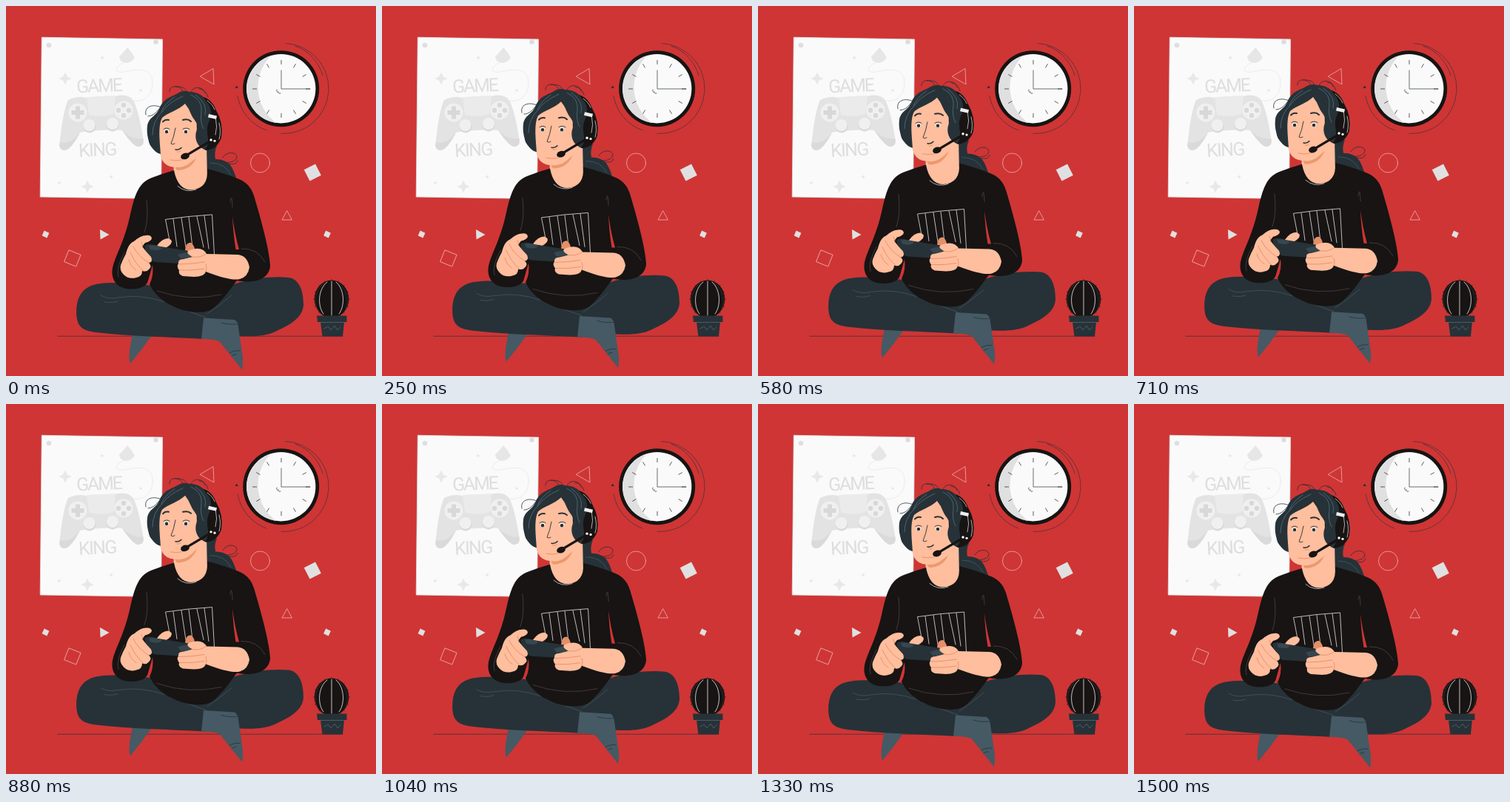
Recreate the animation shown at these times as an HTML page. Size 500 by 500 pixels, loop 1540 ms.

```html
<!DOCTYPE html>
<html lang="en">
<head>
<meta charset="utf-8">
<title>Game king</title>
<style>
  html, body { margin: 0; width: 100%; height: 100%; overflow: hidden; background: #cf3535; }
  svg { display: block; width: 100vw; height: 100vh; }
  .line { fill: none; stroke-linecap: round; stroke-linejoin: round; }
  .thin { stroke-width: .8; }
  .skin { fill: #ffbe9d; }
  .crease { stroke: #e58f68; stroke-width: .9; }
  .slate { fill: #263238; }
  .black { fill: #171413; }
  .pale { fill: #e0e0e0; }
  .word { font: 400 25px Roboto, sans-serif; fill: #dedede; }
</style>
</head>
<body>
<svg viewBox="0 0 500 500">
  <rect width="500" height="500" fill="#cf3535"/>

  <!-- poster -->
  <path d="M48.300 42.300L211.500 45L209.500 260.500L46.200 258Z" fill="#fafafa" stroke="#e4e4e4" stroke-width=".8"/>
  <g fill="#dedede"><circle cx="58" cy="53" r="3.3"/><circle cx="202.500" cy="48.500" r="3.3"/></g>
  <path d="M153 68Q158 64 164 56Q170 62 174 70Q169 77 161 77Q154 76 153 68Z" fill="#e6e6e6"/>
  <path class="line thin" stroke="#e6e6e6" d="M158 77C145 83 147 91 160 89C178 85 199 82 198 106C197 125 180 133 165 126"/>
  <circle cx="182" cy="114" r="1.3" fill="#e0e0e0"/>
  <g id="sparks" fill="#e8e8e8"></g>
  <text class="word" letter-spacing="-2.2" transform="translate(95.500 117.500) rotate(-2.500)">GAME</text>
  <text class="word" letter-spacing="-1.700" transform="translate(98.500 204) rotate(-3)">KING</text>
  <g>
    <path d="M84 127Q96 121 109 124L148 122Q161 118 170 125Q178 134 185 177Q188 189 179 190Q172 190 157 168L146 167L111 169L100 171Q88 194 79 195Q70 194 73 181Q77 142 84 127Z" fill="#e3e3e3"/>
    <path d="M73 184Q70 194 79 195Q88 194 100 171Q87 188 73 184ZM157 168Q172 190 179 190Q188 189 185 179Q172 182 157 168Z" fill="#dadada"/>
    <path d="M109 123L148 121L146 146Q128 151 112 147Z" fill="#ebebeb"/>
    <g fill="#f0f0f0"><circle cx="97" cy="144" r="12.500"/><circle cx="159" cy="141" r="12.500"/></g>
    <g fill="#d8d8d8"><circle cx="113" cy="163" r="8.500"/><circle cx="144" cy="161" r="8.500"/></g>
    <g fill="#f0f0f0"><circle cx="112.500" cy="161" r="8"/><circle cx="144" cy="159" r="8"/></g>
    <path d="M97 135.500V152.500M88.500 144H105.500" stroke="#d8d8d8" stroke-width="6"/>
    <g fill="#d8d8d8"><circle cx="159" cy="134" r="3.2"/><circle cx="166" cy="141" r="3.2"/><circle cx="159" cy="148" r="3.2"/><circle cx="152" cy="141" r="3.2"/></g>
  </g>

  <!-- clock -->
  <circle cx="371.700" cy="111.700" r="51.500" fill="#171413"/>
  <circle cx="371.700" cy="111.700" r="46.700" fill="#fafafa"/>
  <path d="M358 67.200A46.700 46.700 0 0 0 365 158A60 60 0 0 1 358 67.200Z" fill="#e0e0e0"/>
  <g id="ticks" stroke="#333" stroke-width=".8"></g>
  <g class="line" stroke="#263238" stroke-width=".7">
    <path d="M372 87V112H411M366 113Q365 117 368 116Q368 119 371 118"/>
    <path d="M378 50.500A61 61 0 0 1 372 172.500M391 54A59 59 0 0 1 428 94M313 122A60 60 0 0 0 352 168" stroke-width=".6"/>
  </g>
  <path class="slate" d="M309.500 111L311.500 107.500L314 111Z"/>

  <!-- loose shapes -->
  <g class="line" stroke="#f0c0bd" stroke-width=".7">
    <path d="M262.500 95L280 84.500L281 105.500ZM379.500 277L373 289H386Z"/>
    <circle cx="343.500" cy="212" r="13"/>
    <rect x="-8.500" y="-8.500" width="17" height="17" transform="translate(90 341) rotate(22)"/>
  </g>
  <g class="pale">
    <rect x="-8.600" y="-8.600" width="17.200" height="17.200" transform="translate(414.300 225) rotate(-27)"/>
    <rect x="-3.700" y="-3.700" width="7.400" height="7.400" transform="translate(434 308.500) rotate(25)"/>
    <rect x="-3.700" y="-3.700" width="7.400" height="7.400" transform="translate(53.500 308.500) rotate(25)"/>
    <path d="M127 302L139.500 309L127.500 315.500Z"/>
  </g>

  <path class="line" d="M70 446.200H455" stroke="#263238" stroke-width=".7"/>

  <!-- cactus -->
  <g id="spikes" stroke="#171413" stroke-width=".6"></g>
  <ellipse class="black" cx="440" cy="396" rx="23.300" ry="25.500"/>
  <g class="line" stroke="#f5f5f5">
    <path d="M440 372V418M434 373C421 383 421 406 429 416M446 373C458 383 458 406 450 416" stroke-width=".8"/>
    <path d="M430 374C416 386 416 402 422 412M449 374C464 386 463 402 458 412" stroke="#444" stroke-width=".5"/>
  </g>
  <path class="slate" d="M420 418.500H460.500V427H457L455 446.500H427.500L425 427H421Z"/>
  <path class="line thin" stroke="#56676f" d="M425 427.500H457M430 436L435 433L439 438L444 432L448 438L452 434"/>

  <g id="body">
    <!-- ponytail -->
    <path class="slate" d="M268 186L285 189Q281 198 283 207C294 207 301 211 305 218Q309 225 312 236L270 232Z"/>
    <path class="line thin" stroke="#263238" d="M286 209C293 213 311 213 312 204C311 196 297 197 293 205M300 213Q311 216 313 209"/>
    <path class="line thin" stroke="#455a64" d="M276 212Q296 212 304 228"/>

    <!-- legs -->
    <path fill="#455a64" d="M171 443L197 445Q184 464 168 483Q165 477 168 459Z"/>
    <path class="slate" d="M205 379C172 374 128 371 113 379C98 386 94 402 95.500 420C97 434 105 439 121 441C165 446 220 447.500 268 450L318 446C340 447 356 445 368 438C388 429 401 419 402 404C402 384 396 369 382 367C360 365 333 368 308 376Z"/>
    <path class="line thin" stroke="#46565e" d="M128 391Q137 397 152 394Q183 389 214 400M133 400Q143 402 151 399M305 391Q290 404 272 416M270 421L222 404"/>
    <path fill="#455a64" d="M267 421.500L309 424Q313 426 314 434L319.500 472Q321 482 319 491.500L290 455Q286 450 264 450Z"/>
    <path class="line thin" stroke="#263238" d="M302 469Q308 465 316 466M305 473Q308 470 311 471M291 428Q300 431 312 430"/>

    <!-- neck -->
    <path class="skin" d="M226 195L271 185L272 236Q260 253 241 249L227 239Z"/>
    <path d="M228 217Q243 221 258 203Q251 222 231 222Z" fill="#eb996e"/>

    <!-- sweater -->
    <path class="black" d="M227 222C212 227 196 231 188 237C176 246 172 264 167 286C161 313 151 332 145.500 348C139 368 149 380 163 382C178 384 190 380 192 371L198 350Q200 364 194 376C200 389 213 402 236 410C256 416 273 415 282 407C294 396 302 384 312 371C338 376 356 368 357 351C356 330 345 290 337 263C333 247 327 239 315 234Q295 226 272 220Q274 247 250 248.500Q232 248 227 222Z"/>
    <path d="M306 284Q307 308 310.500 329L315 329Q309 308 306 284Z" fill="#cf3535"/>
    <path class="line thin" stroke="#d9d9d9" d="M232 243.500Q243 253 257 248"/>
    <path class="line thin" stroke="#4b4543" d="M190 262Q193 290 187 306M303 265Q305 250 306 272M204 385Q247 400 291 390M318 328Q340 327 350 346M160 333Q148 355 152 366"/>
    <path class="line" stroke="#e6e6e6" stroke-width=".8" d="M222 322L215.500 288.500Q245 284 278.500 282L281.500 336M226 288L231 325M237 286.500L243 326M247 285.500L252 326M258 284.500L267 326M268 283.500L274 328"/>

    <!-- controller and hands -->
    <path fill="#e58f68" d="M242 330Q243 319 250 320Q256 324 255 334Z"/>
    <path class="skin" d="M204 324Q211 314 219 314Q226 316 223 321Q218 328 207 329Z"/>
    <path class="slate" d="M187 324Q194 320 203 324L246 331Q258 332 257 341Q251 349 234 348L202 346Q191 344 187 324Z"/>
    <path fill="#37474f" d="M193 324Q203 322 211 327Q207 332 195 329ZM232 336Q244 331 255 335Q250 341 236 341Z"/>
    <path class="skin" d="M162 335C164 327 167 320 173 318Q182 310 189 310Q196 309 197 314Q196 318 188 320L184 325Q190 333 196 339Q199 346 193 347Q198 352 193 356Q190 360 184 358Q184 366 176 367Q166 370 159 363Q153 357 155 350Q158 342 162 335Z"/>
    <path class="line crease" d="M172 325Q179 339 193 347M168 333Q175 349 186 358M166 343Q168 352 176 357M183 319L185 325"/>
    <path class="skin" d="M248 330Q265 324 271 335L313 336Q326 337 329 353Q327 366 316 369Q304 372 270 359Q268 366 254 366L239 365Q232 362 234 357Q230 352 233 348Q232 342 240 342L252 339Q241 333 248 330Z"/>
    <path class="line crease" d="M251 339Q263 341 270 335M234 349Q251 349 268 346M235 357Q252 358 268 355M270 349Q272 355 270 359"/>
  </g>

  <g id="head">
    <g class="line thin" stroke="#263238">
      <path d="M221 116C220 107 234 106 239 115M228 109C244 108 246 116 242 121M250 117C252 107 268 109 269 118M261 112Q270 113 273 123"/>
      <path d="M189 147C186 134 202 132 211 138M192 149Q200 149 207 139"/>
    </g>
    <path class="black" d="M198 162Q191 167 193 183Q195 192 202 193Z"/>
    <path class="skin" d="M207 150Q205 181 209 203Q212 214 222 217Q240 221 250 210Q262 204 267 190L262 144L243 122L215 136Z"/>
    <path class="black" d="M257 121Q277 122 284 141Q294 158 291 178Q285 194 270 195Q259 190 258 173Z"/>
    <path class="slate" d="M242 132C233 141 219 144 211 151C205 162 208 184 209 200C196 197 189 178 191 162C193 150 203 149 207 139C213 124 224 123 232 118Q239 113 248 116C259 116 267 121 270 128C282 140 276 153 273 160C269 172 278 184 269 194C257 190 254 177 258 167C261 158 253 154 250 146Q247 138 242 132Z"/>
    <path class="line thin" stroke="#56707c" d="M239 122Q219 131 212 142Q198 155 198 174M228 123Q214 132 210 143M250 120Q266 128 264 143Q262 158 267 166M256 120Q273 132 269 147"/>
    <path d="M274 146L285 148.500L284 153L273 150.500Z" fill="#ededed"/>
    <path class="line thin" stroke="#d5d5d5" d="M283.500 153Q286 163 283 174M288 158Q291 170 288 180M272 128Q279 133 282 140"/>
    <path class="line" stroke="#171413" stroke-width="3.200" d="M274 184Q257 194 242 203"/>
    <ellipse class="black" cx="242" cy="203" rx="6" ry="4.200" transform="rotate(-18 242 203)"/>
    <g fill="#fff"><circle cx="277" cy="181" r="1.700"/><circle cx="282" cy="182.300" r="1.600"/></g>

    <!-- face -->
    <g fill="#fff"><ellipse cx="217" cy="169.500" rx="3.200" ry="2.800"/><ellipse cx="243" cy="169.500" rx="3.200" ry="2.800"/></g>
    <g class="slate"><circle cx="217" cy="170" r="2.300"/><circle cx="243" cy="170" r="2.300"/></g>
    <g class="line" stroke="#263238">
      <path d="M212 156.500Q215 153 220 154M239 154Q246 152 250 156" stroke-width="2"/>
      <path d="M213 166.500Q217 163.500 221 166.500M239 166.500Q243 163.500 248 166.500M229 165Q227 177 223 186Q225 188 228 186" stroke-width=".9"/>
      <path d="M229 194Q234 195 237 191.500" stroke-width="1.500"/>
    </g>
    <path class="line crease" d="M231 197Q234 198 236 196M222 208Q230 210 238 208"/>
  </g>
</svg>
<script>
  const $ = id => document.getElementById(id);
  const LOOP = 1540, TOP = 730;

  // radial strokes around a centre
  const rays = (n, cx, cy, r1, r2, squash = 1) => {
    let d = "";
    for (let i = 0; i < n; i++) {
      const a = i / n * 2 * Math.PI, x = Math.cos(a), y = Math.sin(a) * squash;
      d += `M${cx + x * r1} ${cy + y * r1}L${cx + x * r2} ${cy + y * r2}`;
    }
    return `<path d="${d}"/>`;
  };

  const spark = ([x, y, r]) => {
    const k = r * 0.32;
    return `<path d="M${x} ${y - r}L${x + k} ${y - k}L${x + r} ${y}L${x + k} ${y + k}` +
      `L${x} ${y + r}L${x - k} ${y + k}L${x - r} ${y}L${x - k} ${y - k}Z"/>`;
  };

  $("ticks").innerHTML = rays(12, 372, 112, 33, 39);
  $("spikes").innerHTML = rays(16, 440, 396, 21, 24.8, 1.08);
  $("sparks").innerHTML =
    [[80, 98, 8.5], [130, 70, 3], [110, 244, 8.5], [142, 231, 3], [72, 239, 3]].map(spark).join("");

  function draw(t) {
    const lift = (1 + Math.cos((t - TOP) / LOOP * 2 * Math.PI)) / 2;
    $("body").setAttribute("transform", `translate(0 ${-8.2 * lift})`);
    $("head").setAttribute("transform", `translate(0 ${-9 * lift})`);
  }

  const start = performance.now();
  function tick() {
    draw((performance.now() - start) % LOOP);
    requestAnimationFrame(tick);
  }
  tick();
</script>
</body>
</html>
```
